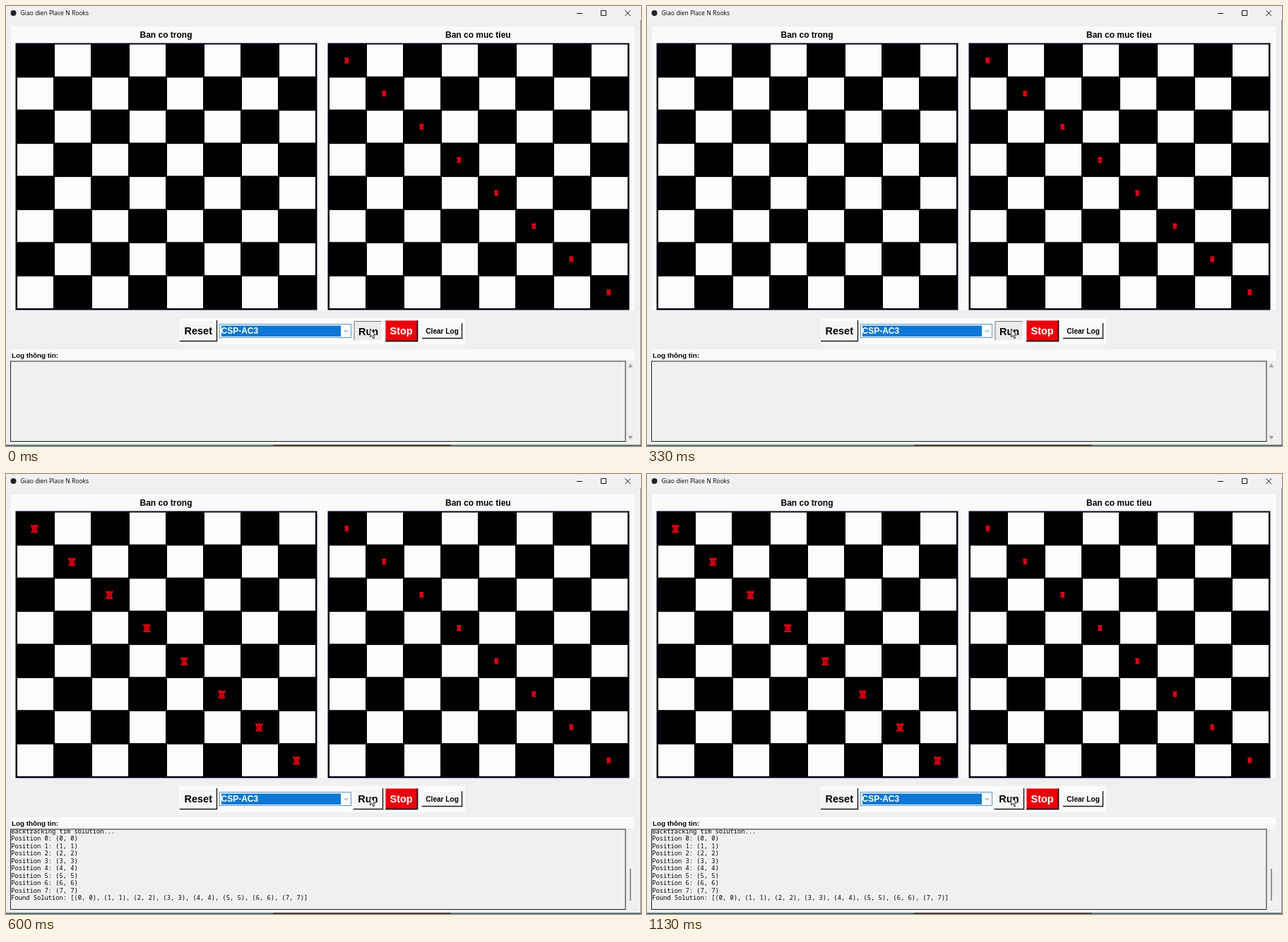
These frames come from a looping animation (899 px wide and 623 px high, 1160 ms). An HTML page:

```html
<!DOCTYPE html>
<html lang="vi">
<head>
<meta charset="utf-8">
<title>Place N Rooks</title>
<style>
  html, body { margin: 0; width: 100%; height: 100%; overflow: hidden; background: #f0f0f0; }
  svg { display: block; width: 899px; height: 623px; }
  text { white-space: pre; fill: #000; }
  .title { font: 8.6px "Open Sans", sans-serif; }
  .bold { font-family: "Liberation Sans", Arial, sans-serif; font-weight: bold; }
  .mono { font: 8.75px "Noto Sans Mono", monospace; }
</style>
</head>
<body>
<svg id="stage" viewBox="0 0 899 623" xmlns="http://www.w3.org/2000/svg"></svg>
<script>
const LOOP = 1160, SOLVED = 500;
const CELL_W = 53, CELL_H = 46.9, N = 8;
const stage = document.getElementById("stage");

function add(parent, tag, attrs, content) {
  const el = document.createElementNS("http://www.w3.org/2000/svg", tag);
  for (const key in attrs) el.setAttribute(key, attrs[key]);
  if (content) el.textContent = content;
  parent.appendChild(el);
  return el;
}
const group = (attrs = {}, parent = stage) => add(parent, "g", attrs);
const rect = (p, x, y, width, height, fill, more) =>
  add(p, "rect", { x, y, width, height, fill, ...more });
const path = (p, d, stroke, width = 1, fill = "none") =>
  add(p, "path", { d, stroke, "stroke-width": width, fill });
const bold = (p, x, y, size, content, fill = "#000") =>
  add(p, "text", { x, y, class: "bold", "font-size": size, style: `fill:${fill}` }, content);

function board(x) {
  rect(stage, x - 1.5, 52.5, 427, 378, "#05051c");
  rect(stage, x, 54.5, 424, 374, "#000");
  for (let r = 0; r < N; r++)
    for (let c = 0; c < N; c++)
      if ((r + c) % 2)
        rect(stage, x + c * CELL_W + 1, 53.5 + r * CELL_H + 1, CELL_W - 2, CELL_H - 1.7, "#fcfcfd");
}

function rooks(parent, x, draw) {
  for (let k = 0; k < N; k++)
    draw(group({ transform: `translate(${x + k * CELL_W} ${77.2 + k * CELL_H})` }, parent));
}

function smallRook(g) {
  path(g, "M-3-4H3V-2L2.5-1V2L3 3V4H-3V3L-2.5 2V-1L-3-2Z", "none", 0, "#ea0018");
  path(g, "M-1-1.5H1.5M-1 1.5H1.5", "#8a0010", 0.8);
}

function bigRook(g) {
  path(g, "M-5-5.5H-3V-4.5H-1V-5.5H1V-4.5H3V-5.5H5V-2.5L3.5-1.5V3L5 4.5V6H-5V4.5L-3.5 3V-1.5L-5-2.5Z",
    "none", 0, "#ee0016");
  path(g, "M-3-2H3M-1.8 0H1.8M-1.8 0V3M1.8 0V3M-3 4H3", "#780008", 0.9);
}

function button(parent, x, y, w, h, fill, pressed) {
  rect(parent, x, y, w, h, fill);
  const top = `M${x + 0.5} ${y + h}V${y + 0.5}H${x + w}`;
  const low = `M${x} ${y + h - 0.5}H${x + w - 0.5}V${y}`;
  path(parent, top, pressed ? "#777" : "#fff");
  path(parent, low, pressed ? "#fff" : "#181818", 1.4);
}

// Window and title bar
rect(stage, 0, 0, 899, 623, "#f0f0f0");
rect(stage, 0, 0, 899, 20, "#f1f1f4");
add(stage, "circle", { cx: 10.5, cy: 10, r: 4, fill: "#222" });
add(stage, "text", { x: 20.5, y: 13.3, class: "title" }, "Giao dien Place N Rooks");
path(stage, "M808 10.5H816M842.5 6.5H849.5V13.5H842.5ZM876.5 6.5L884 14M884 6.5L876.5 14", "#111");

// Boards
rect(stage, 7, 29, 883, 402, "#fafafa");
bold(stage, 189.5, 45, 12, "Ban co trong");
bold(stage, 622, 45, 12, "Ban co muc tieu");
board(15);
board(457);
rooks(stage, 482.3, smallRook);

// Toolbar
rect(stage, 246, 442, 404, 37, "#fbfbfb");
button(stage, 246, 445, 53, 30, "#f6f6f6");
bold(stage, 252.5, 465.3, 14.5, "Reset");
rect(stage, 302.5, 450.5, 186, 19, "#fff", { stroke: "#5b95c4" });
rect(stage, 305, 452.5, 169, 15.5, "#0878d4");
bold(stage, 304.5, 464.3, 12, "CSP-AC3", "#fff");
path(stage, "M478.8 459L481.5 461.6L484.2 459", "#555", 0.9);
const runDown = group(), runUp = group();
button(runDown, 492.5, 446, 40.5, 28.5, "#ececec", true);
bold(runDown, 499, 465.8, 14.5, "Run");
button(runUp, 491.5, 445, 42.5, 30, "#f6f6f6");
bold(runUp, 498.3, 465.3, 14.5, "Run");
button(stage, 537, 445, 46, 30, "#e9000c");
path(stage, "M537.5 475V445.5H583", "#f4606a");
path(stage, "M537 474.5H582.5V445", "#181818", 1.4);
bold(stage, 543.5, 465.3, 14.5, "Stop", "#fff");
button(stage, 589, 449, 57, 22, "#f8f8f8");
bold(stage, 594.3, 463.8, 10.1, "Clear Log");

// Log panel
rect(stage, 7, 486, 883, 16, "#fafafa");
bold(stage, 8, 498.2, 9.85, "Log thông tin:");
rect(stage, 6.5, 503, 870.5, 113.5, "#f0f0f0", { stroke: "#222" });
const arrows = group();
path(arrows, "M880.5 511.5L884 506.5L887.5 511.5ZM880.5 608.8L884 613.5L887.5 608.8Z", "none", 0, "#a2a2a2");

// Desktop showing around the window
rect(stage, 898, 20, 1, 603, "#8b9598");
rect(stage, 0, 621.3, 899, 1.7, "#46676c");
rect(stage, 378, 621.3, 252, 1.7, "#38382f");

// Things that appear with the solution
const solved = group();
rooks(solved, 40.3, bigRook);
const clip = add(stage, "clipPath", { id: "logClip" });
rect(clip, 7, 503.5, 869, 112, "#000");
const log = group({ "clip-path": "url(#logClip)" }, solved);
const cells = [...Array(N).keys()].map(i => `(${i}, ${i})`);
const lines = [
  "Backtracking tim solution...",
  ...cells.map((cell, i) => `Position ${i}: ${cell}`),
  `Found Solution: [${cells.join(", ")}]`
];
lines.forEach((line, i) =>
  add(log, "text", { x: 7.3, y: 508.7 + i * 10.5, class: "mono" }, line));
rect(solved, 883.2, 559, 1.6, 45, "#808080");

// Mouse pointer
path(stage, "M515.5 457V468.8L518 466.4L519.9 470.9L521.7 470.1L519.8 465.8H523.2Z", "#111", 0.9, "#fff");

function render(time) {
  const done = time % LOOP >= SOLVED;
  const show = (el, on) => el.setAttribute("visibility", on ? "visible" : "hidden");
  show(solved, done);
  show(runUp, done);
  show(runDown, !done);
  show(arrows, !done);
}

const start = performance.now();
function tick() {
  render(performance.now() - start);
  requestAnimationFrame(tick);
}
render(0);
requestAnimationFrame(tick);
</script>
</body>
</html>
```
